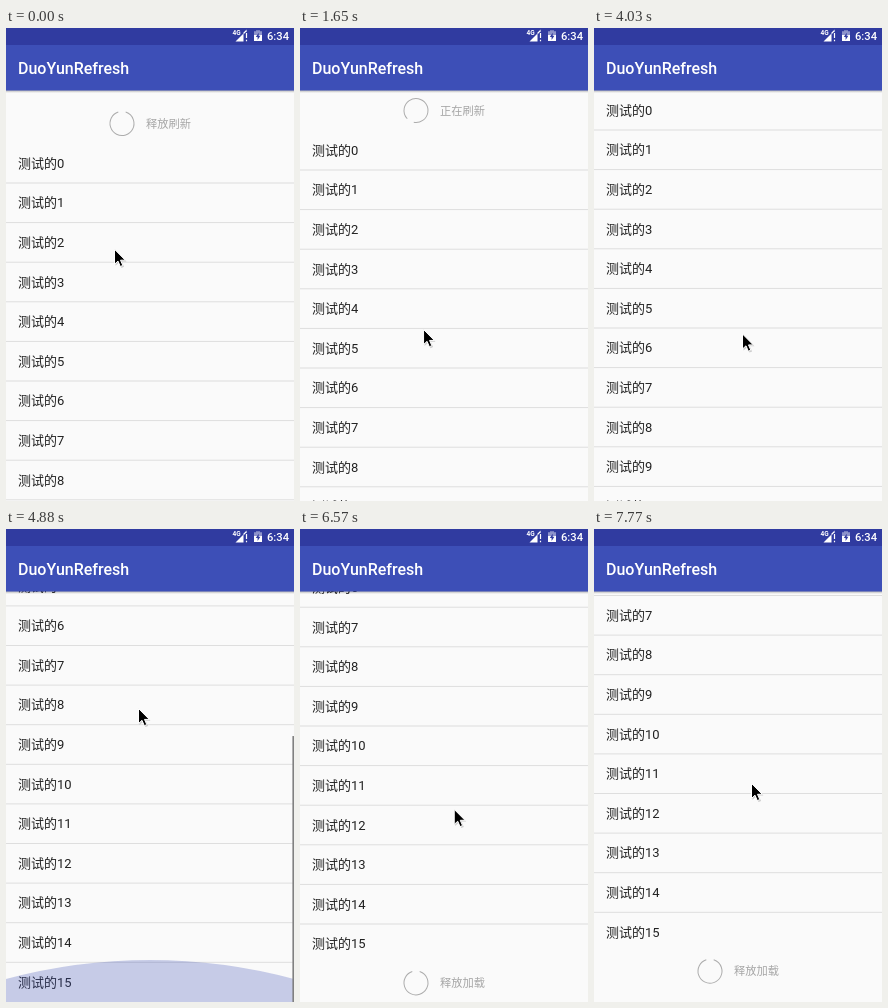
Write an HTML page that moves like this. It is 288 by 473 pixels and loops after 8000 ms.

```html
<!DOCTYPE html>
<html lang="zh-CN">
<head>
<meta charset="utf-8">
<title>Pull to refresh</title>
<style>
  html, body { margin: 0; width: 100%; height: 100%; overflow: hidden; background: #fafafa; }
  svg { display: block; width: 288px; height: 473px; }
  text { font-family: Roboto, "Noto Sans CJK SC", "Noto Sans CJK", sans-serif; }
  .row { font-size: 13px; fill: #212121; }
  .hint { font-size: 11.25px; fill: #a6a6a6; }
  .ring { fill: none; stroke: #acacac; stroke-width: 1; }
  .bar { fill: #fff; font-weight: 500; }
</style>
</head>
<body>
<svg viewBox="0 0 288 473">
  <defs>
    <linearGradient id="shade" x2="0" y2="1">
      <stop offset="0" stop-opacity=".3"/>
      <stop offset="1" stop-opacity="0"/>
    </linearGradient>
  </defs>
  <rect width="288" height="473" fill="#fafafa"/>
  <g id="list"></g>
  <path id="glow" fill="#3f51b5"/>
  <rect id="thumb" x="286.4" width="1.6" fill="#808080"/>

  <rect y="62" width="288" height="3" fill="url(#shade)"/>
  <rect width="288" height="62.5" fill="#3d4fb7"/>
  <rect width="288" height="17" fill="#303ba0"/>
  <text class="bar" x="12" y="46" font-size="16">DuoYunRefresh</text>
  <text class="bar" x="261" y="12" font-size="11.2">6:34</text>
  <text class="bar" x="226.5" y="7" font-size="6.5" style="font-weight:700">4G</text>
  <path d="M229.5 13.5L237.5 5.5V13.5Z" fill="#fff"/>
  <path d="M237.5 5.5L240 3V4M240.5 5V10M240.5 11.8V13.3" fill="none" stroke="#fff" stroke-width="1.2"/>
  <path d="M250 3.2V2.2H254V3.2H256V7H248V3.2Z" fill="#fff" opacity=".45"/>
  <path d="M248 7H256V13H248Z" fill="#fff"/>
  <path d="M252.7 4.8L249.8 9H251.6V12L254.4 7.8H252.7Z" fill="#303ba0"/>

  <g id="cursor">
    <path d="M1 1.5V16.5L4.6 13.2L7 18.6L9.6 17.5L7.2 12.2H12Z" fill="#000" opacity=".18"/>
    <path d="M0 0V15L3.5 11.8L5.8 17.2L8.3 16.1L6 10.9H10.8Z" fill="#000" stroke="#fff"/>
  </g>
</svg>
<script>
const LOOP = 8000, TOP = 62.5, PITCH = 39.6, ROWS = 16;
const VIEW = 473 - TOP, TOTAL = ROWS * PITCH, MAX = TOTAL - VIEW;
const DRAG = 0.45;  // list travel per pixel of finger travel beyond an end
const $ = id => document.getElementById(id);
const clamp = v => Math.max(0, Math.min(1, v));
const ramp = (t, from, to) => clamp((t - from) / (to - from));
const ease = p => 1 - (1 - p) ** 2;

function add(name, attrs, text = "") {
  const el = document.createElementNS("http://www.w3.org/2000/svg", name);
  for (const k in attrs) el.setAttribute(k, attrs[k]);
  el.textContent = text;
  return $("list").appendChild(el);
}

function loader(y) {
  const ring = add("circle", { class: "ring", r: 12, pathLength: 360 });
  const label = add("text", { class: "hint", x: 140, y: y + 4 });
  return (text, progress, turn) => {
    label.textContent = text;
    ring.setAttribute("stroke-dasharray", `${324 * progress} 360`);
    ring.setAttribute("transform", `translate(116 ${y}) rotate(${72 + turn}) scale(-1 1)`);
  };
}

for (let i = 0; i < ROWS; i++) {
  const y = TOP + i * PITCH;
  add("text", { class: "row", x: 12, y: y + 24.3 }, "测试的" + i);
  if (i < ROWS - 1) add("rect", { y: y + PITCH - 0.6, width: 288, height: 1, fill: "#dedede" });
}
const header = loader(TOP - 20);
const footer = loader(TOP + TOTAL + 19.2);

function draw(t) {
  // Refresh: pull down, settle on the header, close it.
  const pull = 28 * ramp(t, 30, 370);
  const settle = ease(ramp(t, 540, 800));
  const close = ease(ramp(t, 3640, 4020));
  // Load more: scroll to the end, then pull up twice.
  const scroll = ease(ramp(t, 4230, 4830));
  const lift = 38.3 * ease(ramp(t, 5560, 6570)) + 11.7 * ramp(t, 6690, 7770);

  const open = 53 + pull;
  const y = (open + (40 - open) * settle) * (1 - close) - MAX * scroll - lift;
  $("list").setAttribute("transform", `translate(0 ${y})`);

  const spin = 0.25 * (Math.max(816, Math.min(3440, t)) - 816);
  header(t < 800 ? "释放刷新" : "正在刷新", 1, spin);
  footer(lift < 36 ? "上拉加载" : "释放加载", clamp(lift / 38), 0);

  const glow = ramp(t, 4790, 4870) * (1 - ramp(t, 4930, 5260));
  const crest = 473 - 42 * glow, edge = crest + 19;
  $("glow").setAttribute("d", `M0 ${edge}A555 555 0 0 1 288 ${edge}V500H0Z`);
  $("glow").setAttribute("opacity", 0.28 * glow);

  $("thumb").setAttribute("y", TOP + MAX * scroll / TOTAL * VIEW);
  $("thumb").setAttribute("height", VIEW * VIEW / TOTAL);
  $("thumb").setAttribute("opacity", t < 4230 ? 0 : 1 - ramp(t, 5100, 5350));

  // The pointer drags the list, and wanders between the drags.
  const rest = ramp(t, 540, 1000), drift = ramp(t, 1650, 2170);
  const back = ramp(t, 5060, 5480);
  const px = 108.5 + 9 * pull / 28 + 6 * rest + 25 * drift
    - 16 * scroll + 19 * back + 6 * ramp(t, 5560, 7770);
  const py = 221.3 + pull / DRAG + 18 * rest + 14 * drift - 11 * ramp(t, 3650, 4090)
    - 125 * scroll + 186 * back - lift / DRAG;
  $("cursor").setAttribute("transform", `translate(${px} ${py})`);
}

const start = performance.now();
function tick() {
  draw((performance.now() - start) % LOOP);
  requestAnimationFrame(tick);
}
tick();
</script>
</body>
</html>
```
